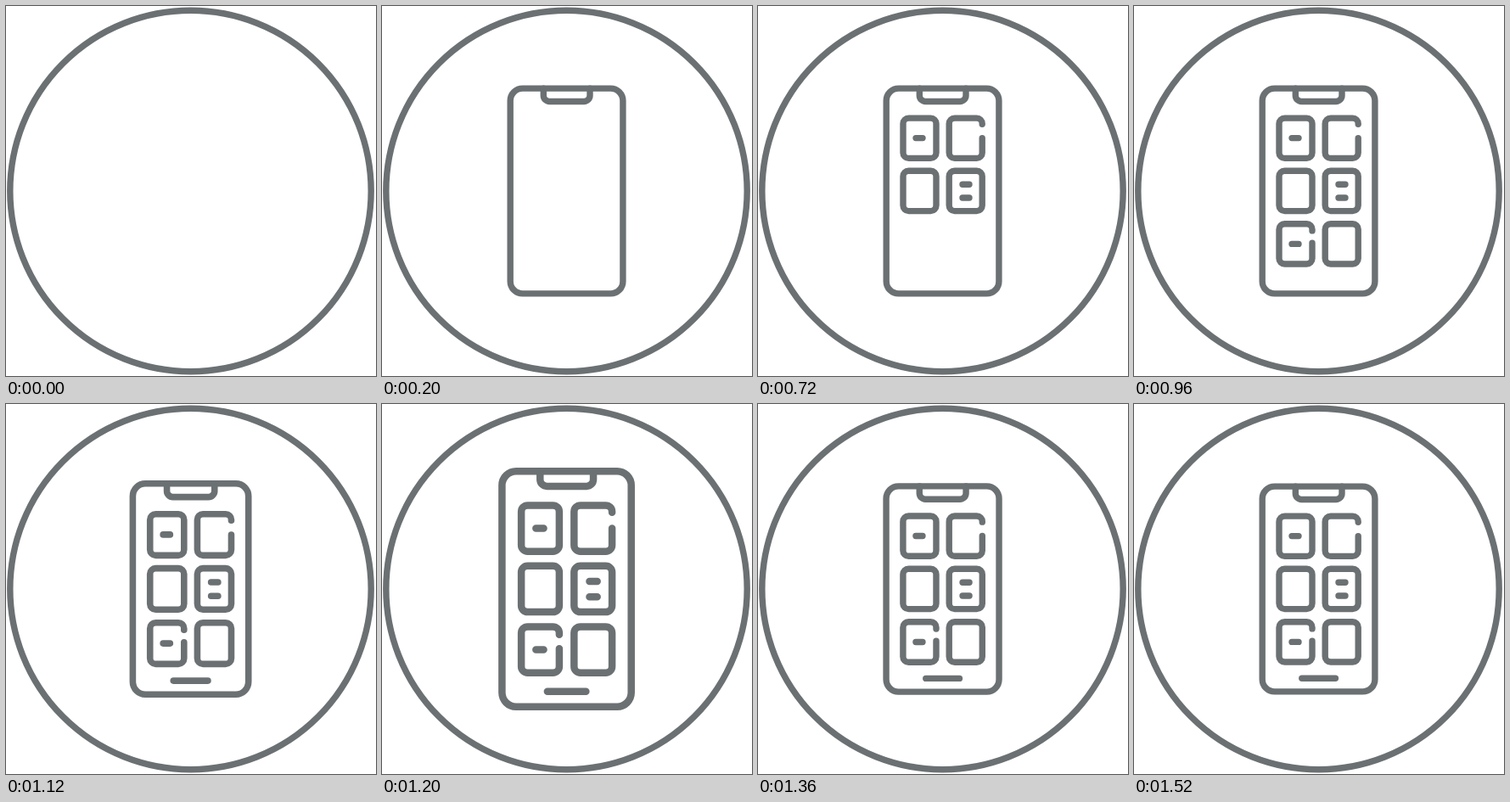
An HTML page that plays this animation: 436 by 436 pixels, repeating every 2080 ms.

```html
<!DOCTYPE html>
<html lang="en">
<head>
<meta charset="utf-8">
<title>Phone apps</title>
<style>
  html, body { margin: 0; height: 100%; overflow: hidden; background: #fff; }
  svg { display: block; width: 100%; height: 100%; }
  g, circle { fill: none; stroke: #6b7073; stroke-width: 7.4; stroke-linecap: round; stroke-linejoin: round; }
</style>
</head>
<body>
<svg viewBox="0 0 436 436">
  <circle cx="217.5" cy="218" r="212.7"/>
  <g id="phone">
    <g data-at="200">
      <rect x="151.2" y="97.1" width="132.7" height="241.8" rx="14.5"/>
      <path d="M190.3 97.1V105.5a7 7 0 0 0 7 7H238a7 7 0 0 0 7-7V97.1"/>
    </g>
  </g>
</svg>
<script>
const LOOP = 2080, STEP = 40;
const phone = document.getElementById('phone');

function addPart(at, d) {
  const part = document.createElementNS('http://www.w3.org/2000/svg', 'g');
  const path = document.createElementNS('http://www.w3.org/2000/svg', 'path');
  part.dataset.at = at;
  path.setAttribute('d', d);
  part.append(path);
  phone.append(part);
}

// Rounded tile drawn from its right side; gap = [upper end, lower start] below the top.
function tile(x, y, gap) {
  const w = 39, h = 47.3, r = 6.5;
  const [end, start] = gap || [h / 2, h / 2];
  return `M${x + w} ${y + start}V${y + h - r}a${r} ${r} 0 0 1 ${-r} ${r}H${x + r}` +
    `a${r} ${r} 0 0 1 ${-r} ${-r}V${y + r}a${r} ${r} 0 0 1 ${r} ${-r}` +
    `H${x + w - r}a${r} ${r} 0 0 1 ${r} ${r}V${y + end}`;
}
const dash = (x, y, w = 8) => `M${x} ${y}h${w}`;

const left = 171, right = 225.2, rows = [132.1, 194.3, 256.7];
addPart(360, tile(left, rows[0]) + dash(186, 155.6));
addPart(480, tile(right, rows[0], [7.2, 23.6]));
addPart(600, tile(left, rows[1]));
addPart(720, tile(right, rows[1]) + dash(241, 210.2) + dash(241, 226));
addPart(840, tile(left, rows[2], [8.2, 22.5]) + dash(186, 280.4));
addPart(960, tile(right, rows[2]));
addPart(1080, dash(197.8, 323.2, 39.6));

// Pulse: [time, scale], eased in and out between keys
const keys = [[1080, 1], [1240, 1.175], [1400, 0.97], [1520, 1]];

function scaleAt(t) {
  const i = keys.findIndex(([time]) => t < time);
  if (i < 1) return 1;
  const [t0, s0] = keys[i - 1], [t1, s1] = keys[i];
  const p = (t - t0) / (t1 - t0);
  return s0 + (s1 - s0) * p * p * (3 - 2 * p);
}

const parts = [...phone.children];
const begin = performance.now();

function draw() {
  const elapsed = (performance.now() - begin) % LOOP;
  const t = Math.floor(elapsed / STEP) * STEP;
  for (const part of parts) part.style.display = t >= part.dataset.at ? '' : 'none';
  phone.setAttribute('transform',
    `translate(217.5 218) scale(${scaleAt(t)}) translate(-217.5 -218)`);
  requestAnimationFrame(draw);
}
draw();
</script>
</body>
</html>
```
